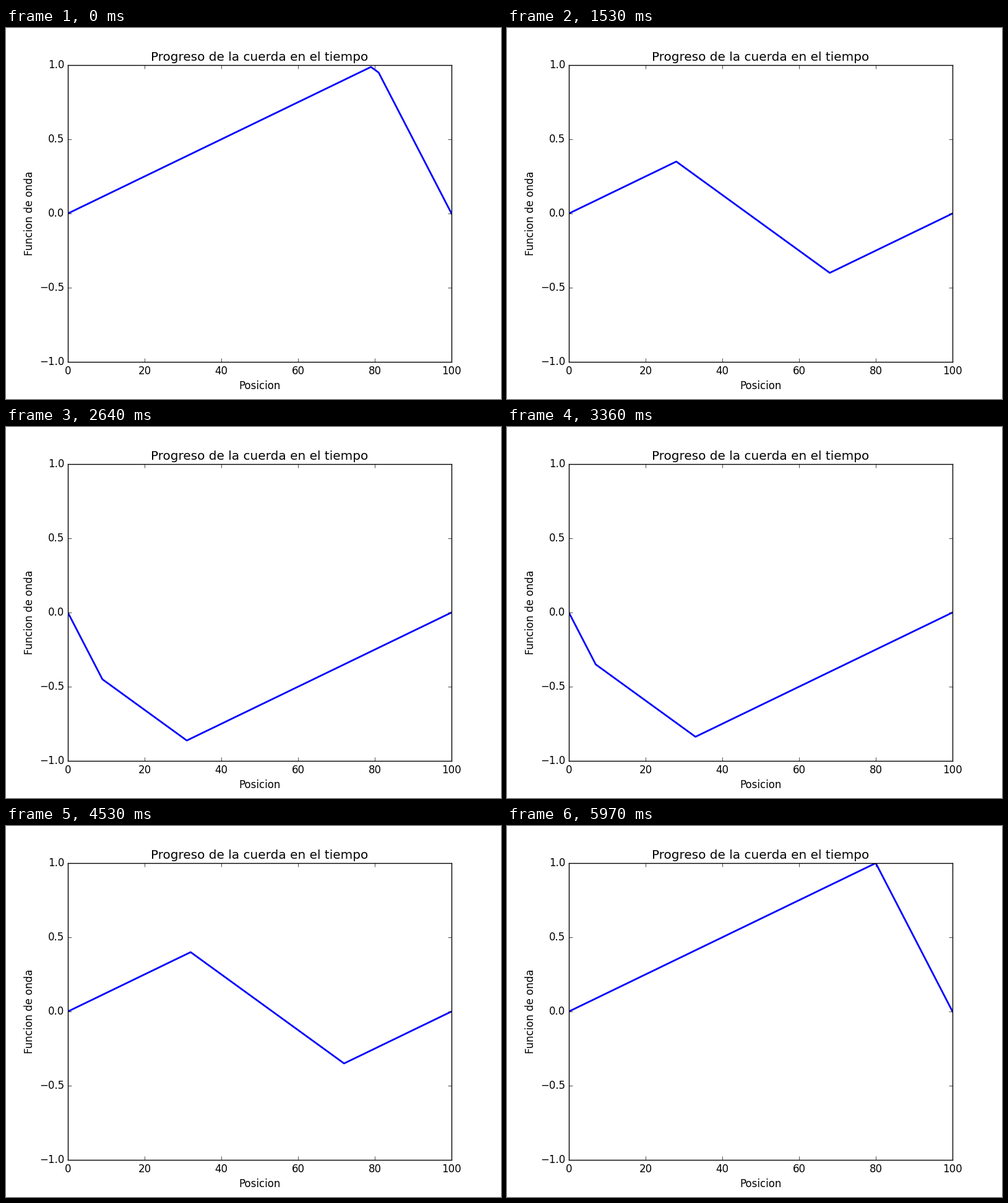
Recreate the animation shown at these times as a matplotlib script. Size 800 px wide and 600 px high, loop 6000 ms.

```python
import numpy as np
import matplotlib.pyplot as plt
from matplotlib.animation import FuncAnimation

plt.style.use("classic")
plt.rcParams["font.family"] = "DejaVu Sans"

LENGTH = 100   # string length; the wave travels one unit per frame
PLUCK = 80     # where the string is pulled
FRAMES = 2 * LENGTH
INTERVAL = 30

x = np.arange(LENGTH + 1)


def shape(pos):
    """Plucked string at rest, extended as an odd function of period 2 * LENGTH."""
    pos = (pos + LENGTH) % (2 * LENGTH) - LENGTH
    d = np.abs(pos)
    return np.sign(pos) * np.minimum(d / PLUCK, (LENGTH - d) / (LENGTH - PLUCK))


def wave(t):
    return (shape(x - t) + shape(x + t)) / 2


fig, ax = plt.subplots(figsize=(8, 6), dpi=100, facecolor="white")
ax.set_xlim(0, LENGTH)
ax.set_ylim(-1, 1)
ax.set_yticks(np.linspace(-1, 1, 5))
ax.set_title("Progreso de la cuerda en el tiempo")
ax.set_xlabel("Posicion")
ax.set_ylabel("Funcion de onda")
line, = ax.plot(x, wave(1), color="blue", lw=2)


def update(i):
    line.set_ydata(wave(i + 1))
    return line,


anim = FuncAnimation(fig, update, frames=FRAMES, interval=INTERVAL,
                     repeat=True, repeat_delay=0, blit=False)
plt.show()
```
